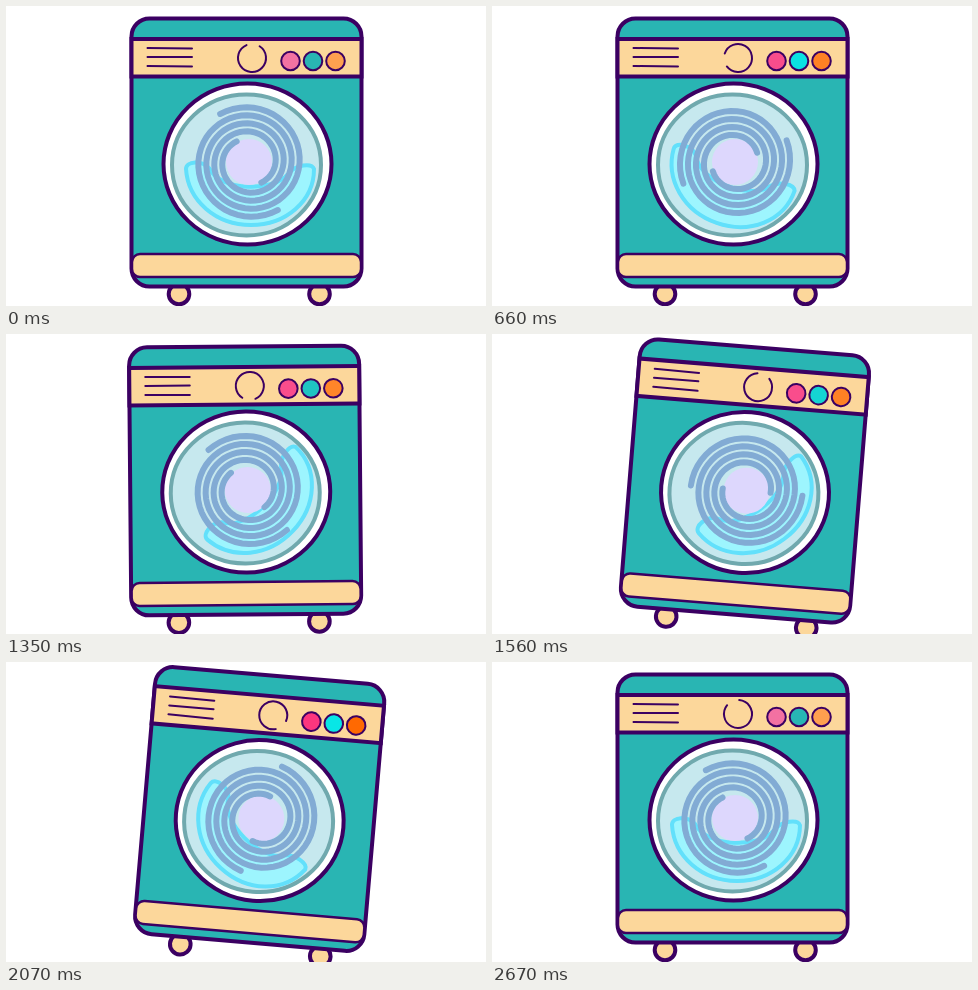
Write an HTML page that moves like this. It is 480 px wide and 300 px high and loops after 2700 ms.

```html
<!DOCTYPE html>
<html lang="en">
<head>
<meta charset="utf-8">
<title>Washing machine</title>
<style>
  html, body { margin: 0; width: 100%; height: 100%; overflow: hidden; background: #fff; }
  svg { display: block; width: 480px; height: 300px; }
  .cream { fill: #fcd79b; }
  .line { fill: none; stroke: #3b0062; stroke-linecap: round; }
</style>
</head>
<body>
<svg viewBox="0 0 480 300">
  <g id="machine" stroke="#3b0062" stroke-width="4">
    <circle class="cream" cx="173" cy="288" r="10.3"/>
    <circle class="cream" cx="313.500" cy="288" r="10.3"/>
    <rect x="125.500" y="12.500" width="230" height="268" rx="18" fill="#29b5b3"/>
    <rect class="cream" x="125.500" y="33" width="230" height="37.500"/>
    <rect class="cream" x="126" y="248" width="229" height="23" rx="8" stroke-width="2.500"/>
    <path class="line" stroke-width="2" d="M141.500 42l44.500 .5M141.500 51h44.500M141.500 60l44.500 .5"/>
    <path id="dial" class="line" stroke-width="2"/>
    <g id="buttons" stroke-width="2">
      <circle cx="284.500" cy="55" r="9.300"/>
      <circle cx="307" cy="55" r="9.300"/>
      <circle cx="329.500" cy="55" r="9.300"/>
    </g>
    <ellipse cx="241.500" cy="158" rx="84" ry="80.500" fill="#fff"/>
    <ellipse cx="240.500" cy="159" rx="74.500" ry="70.500" fill="#c6e8ee" stroke="#70a9ae"/>
    <path id="water" fill="#9df5fe" stroke="#62e0fb"
      d="M180 163C180 155 196 154 203 162C215 186 268 186 282 168C290 158 306 157 308 163C308 195 280 219 245 219C210 219 182 195 180 163Z"/>
    <circle cx="243" cy="156" r="23" fill="#ddd7fd" stroke="none"/>
    <path id="swirl" fill="none" stroke="#82abd4" stroke-width="6" stroke-linecap="round"/>
  </g>
</svg>
<script>
const LOOP = 2700;
const $ = id => document.getElementById(id);
const polar = (cx, cy, r, deg) => {
  const a = deg * Math.PI / 180;
  return (cx + r * Math.cos(a)).toFixed(2) + ' ' + (cy + r * Math.sin(a)).toFixed(2);
};

// Two-armed spiral, two turns per arm
function spiralArm(start) {
  const points = [];
  for (let turn = 0; turn <= 2.001; turn += 0.02)
    points.push(polar(243, 156, 24 + 16 * turn, start - turn * 360));
  return 'M' + points.join('L');
}
$('swirl').setAttribute('d', spiralArm(-121) + spiralArm(59));
$('dial').setAttribute('d', `M${polar(246, 52, 14, -58)}A14 14 0 1 1 ${polar(246, 52, 14, -114)}`);

// Smooth curve through [time, value] keys, flat at ends and turning points
function curve(keys, t) {
  const slope = i => {
    if (!i || i === keys.length - 1) return 0;
    const [a, b, c] = [keys[i - 1], keys[i], keys[i + 1]];
    const before = (b[1] - a[1]) / (b[0] - a[0]), after = (c[1] - b[1]) / (c[0] - b[0]);
    return before * after > 0 ? (before + after) / 2 : 0;
  };
  let i = 0;
  while (i < keys.length - 2 && t >= keys[i + 1][0]) i++;
  const [t0, v0] = keys[i], [t1, v1] = keys[i + 1];
  const d = t1 - t0, x = (t - t0) / d, s = x * x * (3 - 2 * x);
  return v0 + (v1 - v0) * s + d * x * (1 - x) * (slope(i) * (1 - x) - slope(i + 1) * x);
}

const SWING = 133;
const shake = [[0, 0], [1147, 0]];
for (let i = 1; i <= 8; i++) shake.push([1147 + i * SWING, i % 2 ? 5 : -5]);
shake.push([1147 + 9 * SWING, 0], [LOOP, 0]);

const tilt = [[0, 0], [450, 28], [1450, -48], [2100, 38], [LOOP, 0]];
const spin = [[0, 0], [660, 98], [1140, 231], [1560, 481], [1860, 673], [2280, 836], [LOOP, 900]];

const glowTimes = [0, 660, 1140, 1560, 1860, 2280, LOOP];
const lights = [
  { off: [242, 123, 168], on: [255, 31, 112], glow: [.1, .5, .5, .5, .5, 1, .1] },
  { off: [41, 181, 179], on: [0, 242, 242], glow: [0, .75, .05, .5, .55, 1, 0] },
  { off: [255, 160, 80], on: [255, 104, 0], glow: [0, .55, .5, .55, 1, .85, 0] }
];
for (const light of lights) light.keys = glowTimes.map((time, i) => [time, light.glow[i]]);

const rotate = (id, angle, x, y) => $(id).setAttribute('transform', `rotate(${angle} ${x} ${y})`);

function draw(now) {
  const t = now % LOOP;
  rotate('machine', curve(shake, t), 241, 300);
  rotate('dial', t / LOOP * 360 * 7, 246, 52);
  rotate('water', curve(tilt, t), 241, 158);
  rotate('swirl', curve(spin, t), 243, 156);
  lights.forEach(({ off, on, keys }, i) => {
    const level = curve(keys, t);
    const rgb = off.map((c, k) => Math.round(c + (on[k] - c) * level));
    $('buttons').children[i].setAttribute('fill', `rgb(${rgb})`);
  });
}

const begin = performance.now();
function tick() {
  draw(performance.now() - begin);
  requestAnimationFrame(tick);
}
tick();
</script>
</body>
</html>
```
